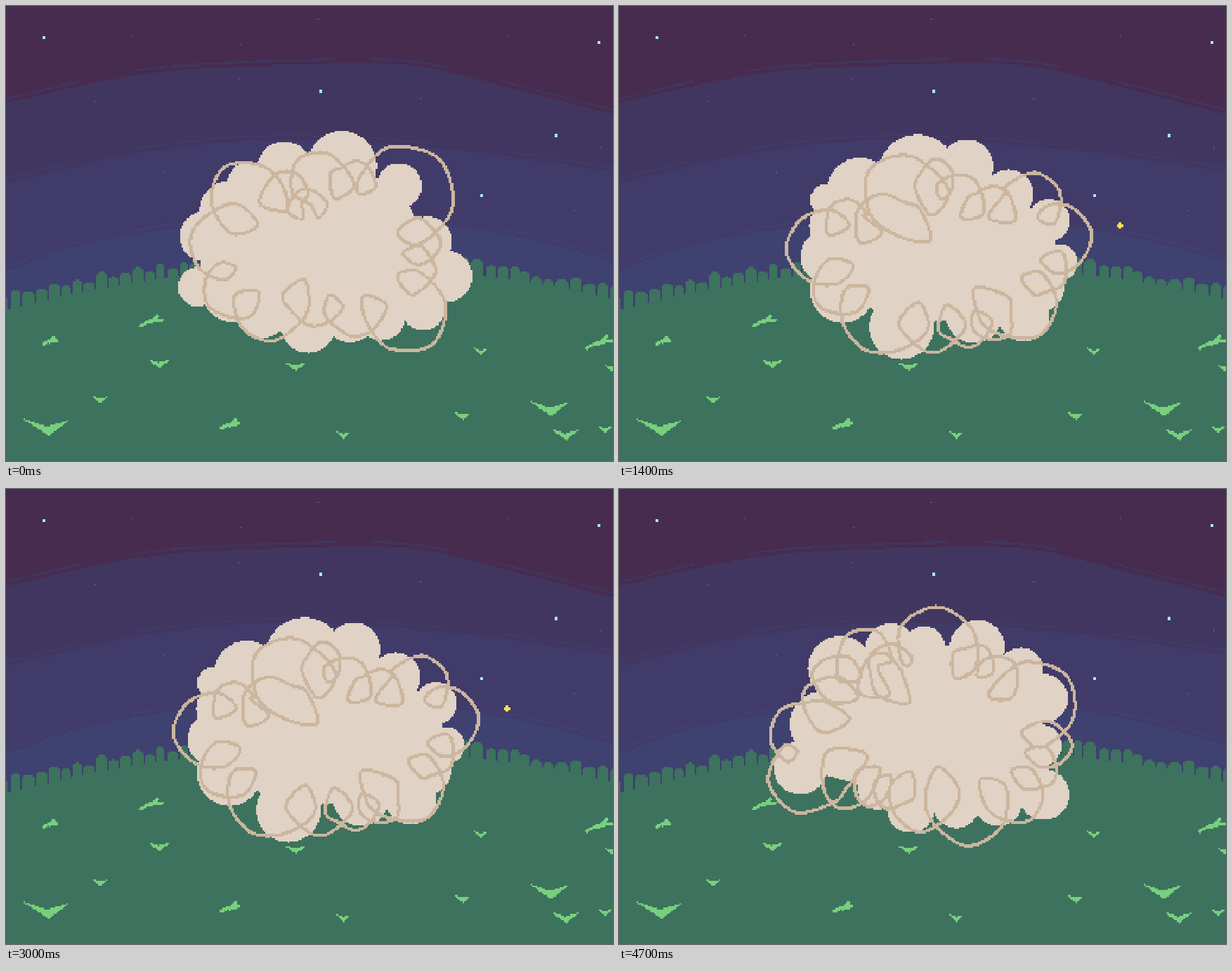
These frames come from a looping animation (864x648 px, 4800 ms). An HTML page with a canvas:

```html
<!DOCTYPE html>
<html lang="en">
<head>
<meta charset="utf-8">
<title>Scuffle cloud at night</title>
<style>
  html, body { margin: 0; width: 100%; height: 100%; overflow: hidden; background: #472c50; }
  canvas { display: block; width: 864px; height: 648px; image-rendering: pixelated; }
</style>
</head>
<body>
<canvas id="stage" width="384" height="288"></canvas>
<script>
const W = 384, H = 288, PIXEL = 2.25, STEP = 100;
const CREAM = '#e0d2c4', TAN = '#ccb69f', HILL = '#3d725e', LEAF = '#78d07d', YELLOW = '#ffe04c';
const CENTRE = [445, 335];

const rows = (text, size) => {
  const all = text.trim().split(/\s+/).map(Number);
  return Array.from({ length: all.length / size }, (_, i) => all.slice(i * size, (i + 1) * size));
};

function seeded(seed) {
  return () => (seed = (seed * 16807) % 2147483647) / 2147483647;
}

function newCanvas() {
  const canvas = document.createElement('canvas');
  canvas.width = W;
  canvas.height = H;
  return canvas;
}

// Paints one flat colour in stage units, with hard pixel edges.
function layer(target, color, paint, mirrored) {
  const canvas = newCanvas(), ctx = canvas.getContext('2d', { willReadFrequently: true });
  ctx.scale(1 / PIXEL, 1 / PIXEL);
  if (mirrored) ctx.transform(-1, 0, 0, 1, 910, 0);
  ctx.fillStyle = ctx.strokeStyle = color;
  ctx.lineWidth = 4.5;
  paint(ctx);
  const image = ctx.getImageData(0, 0, W, H), data = image.data;
  for (let i = 3; i < data.length; i += 4) data[i] = data[i] > 120 ? 255 : 0;
  ctx.putImageData(image, 0, 0);
  target.drawImage(canvas, 0, 0);
}

// Smooth line through the points.
function spline(p, closed) {
  const n = p.length;
  const at = i => closed ? p[(i + n) % n] : p[Math.max(0, Math.min(n - 1, i))];
  let d = 'M' + p[0];
  for (let i = 0; i < (closed ? n : n - 1); i++) {
    const [a, b, c, e] = [at(i - 1), at(i), at(i + 1), at(i + 2)];
    const c1 = b.map((v, k) => v + (c[k] - a[k]) / 6);
    const c2 = c.map((v, k) => v - (e[k] - b[k]) / 6);
    d += `C${c1} ${c2} ${c}`;
  }
  return d;
}

// puffs: x, y, radius. loops: x, y, length, lift of the arc that follows.
const poses = [
  {
    puffs: `283 328 36  318 292 43  344 252 29  396 232 39  478 228 50  560 256 32  600 335 35
      628 385 36  594 431 31  535 443 33  490 440 39  430 455 39  365 432 40  322 408 42  273 400 28`,
    loops: `325 303 34 68  376 266 34 43  411 286 20 24  445 282 20 65  478 247 29 28
      515 250 22 94  587 320 30 32  587 355 22 27  583 395 28 84  527 437 30 36
      466 432 22 30  412 420 33 54  337 427 30 42  307 378 20 55`
  },
  {
    puffs: `312 312 41  295 276 23  343 263 47  425 240 57  495 228 38  555 268 35  612 305 30
      627 365 26  599 400 35  576 442 36  505 440 40  402 457 46  318 405 46  296 357 38`,
    loops: `345 318 30 46  412 308 40 88  445 260 38 42  463 258 18 32  507 285 26 30
      555 288 32 55  617 296 22 52  626 365 26 26  597 396 26 64  535 432 42 38
      518 455 24 30  474 457 32 38  419 455 34 59  332 418 28 45  305 378 30 65  300 308 28 38`
  },
  {
    puffs: `290 335 47  315 255 46  387 228 37  435 223 28  510 225 39  572 258 32  605 298 34
      600 365 30  605 435 36  540 446 34  480 450 33  415 455 34  368 428 28  258 397 38`,
    loops: `292 325 36 43  312 287 30 42  320 255 28 68  355 272 36 42  386 278 38 45
      408 240 12 74  492 243 30 28  523 255 18 34  550 284 26 79  603 349 30 43
      602 381 24 34  580 412 24 54  536 437 32 72  460 435 40 56  403 430 30 30
      374 423 20 34  350 415 28 50  310 400 48 75  236 377 18 50`
  }
];

function drawPuffs(ctx, puffs) {
  ctx.beginPath();
  puffs.forEach(([x, y]) => ctx.lineTo(x, y));
  ctx.fill();
  puffs.forEach(([x, y, r]) => {
    ctx.beginPath();
    ctx.arc(x, y, r, 0, Math.PI * 2);
    ctx.fill();
  });
}

// One endless pen line: a loop towards the centre, then an arc bulging outwards.
function curlLine(loops) {
  return spline(loops.flatMap(([x, y, length, lift], i) => {
    const [nextX, nextY] = loops[(i + 1) % loops.length];
    const toCentre = Math.hypot(CENTRE[0] - x, CENTRE[1] - y);
    const ux = (CENTRE[0] - x) / toCentre, uy = (CENTRE[1] - y) / toCentre;
    const half = length * 0.62;
    const chord = Math.hypot(nextX - x, nextY - y);
    const dx = (nextX - x) / chord, dy = (nextY - y) / chord;
    const shoulder = chord * 0.25 + lift * 0.4;
    const arc = (along, out) =>
      [(x + nextX) / 2 + dx * along + dy * out, (y + nextY) / 2 + dy * along - dx * out];
    return [
      [x + uy * half, y - ux * half],
      [x + ux * length, y + uy * length],
      [x - uy * half, y + ux * half],
      arc(-shoulder, lift * 0.6), arc(0, lift), arc(shoulder, lift * 0.6)
    ];
  }), true);
}

function drawCloud({ puffs, loops }, mirrored) {
  const canvas = newCanvas(), ctx = canvas.getContext('2d');
  layer(ctx, CREAM, c => drawPuffs(c, rows(puffs, 3)), mirrored);
  layer(ctx, TAN, c => c.stroke(new Path2D(curlLine(rows(loops, 4)))), mirrored);
  return canvas;
}

const bands = [
  { color: '#41365f', edge: '0 138 200 96 420 83 580 85 700 112 864 154' },
  { color: '#413b69', edge: '0 252 200 207 400 190 640 205 864 236' },
  { color: '#3f4170', edge: '0 377 150 331 450 295 700 323 864 364' }
];
const brightStars = '54 44  447 122  783 185  677 271  844 51';
const dimStars = '445 19  178 42  334 55  332 105  126 136  714 42  590 131  848 202  223 237  808 291';

// Centre x, centre y, half width.
const tufts = `218 510 9  412 514 9  134 561 6  58 602 25  480 611 6  650 584 6
  676 492 6  774 575 21  861 516 5  796 611 13  853 603 6`;
const sprigs = '63 477 11  207 449 17  319 596 15  845 479 20';

const snap = v => Math.round(v / PIXEL) * PIXEL;
const dots = (text, size) => ctx => rows(text, 2).forEach(([x, y]) =>
  ctx.fillRect(snap(x - size / 2), snap(y - size / 2), size, size));

const hillTop = x => 351 + 62 * ((x - 465) / 465) ** 2;

function drawHill(ctx) {
  const random = seeded(11);
  for (let x = -8; x < 864;) {
    const width = 14 + random() * 8, top = hillTop(x + width / 2) + random() * 16 - 5;
    ctx.beginPath();
    ctx.roundRect(snap(x), top, snap(width - PIXEL), 60, [width / 2, width / 2, 0, 0]);
    ctx.fill();
    x += width;
  }
  ctx.beginPath();
  for (let x = 0; x <= 864; x += 8) ctx.lineTo(x, hillTop(x) + 20);
  ctx.lineTo(864, 648);
  ctx.lineTo(0, 648);
  ctx.fill();
}

function drawGrass(ctx) {
  ctx.lineWidth = 3;
  rows(tufts, 3).forEach(([x, y, w]) => {
    const blade = new Path2D(`M${x - w} ${y - w * 0.4}L${x} ${y - w * 0.05}L${x + w} ${y - w * 0.35}L${x + w * 0.1} ${y + w * 0.25 + 2}Z`);
    ctx.fill(blade);
    ctx.stroke(blade);
  });
  ctx.lineWidth = 4.5;
  rows(sprigs, 3).forEach(([x, y, w]) => {
    ctx.stroke(new Path2D(`M${x - w} ${y + w * 0.45}L${x - w * 0.2} ${y}L${x + w} ${y - w * 0.1}` +
      `M${x + w * 0.6} ${y - w * 0.5}L${x - w * 0.2} ${y + w * 0.2}`));
  });
}

function drawScenery() {
  const canvas = newCanvas(), ctx = canvas.getContext('2d');
  ctx.fillStyle = '#472c50';
  ctx.fillRect(0, 0, W, H);
  for (const { color, edge } of bands) {
    const line = spline(rows(edge, 2));
    layer(ctx, color, c => {
      c.fill(new Path2D(line + 'V648H0Z'));
      c.lineWidth = 2.6;
      c.setLineDash([110, 75, 290, 50]);
      c.translate(0, -6);
      c.stroke(new Path2D(line));
    });
  }
  layer(ctx, '#485875', dots(dimStars, PIXEL));
  layer(ctx, '#a4e7f0', dots(brightStars, PIXEL * 2));
  layer(ctx, HILL, drawHill);
  layer(ctx, LEAF, drawGrass);
  return canvas;
}

function drawSpark(color, paint) {
  const canvas = newCanvas();
  layer(canvas.getContext('2d'), color, paint);
  return canvas;
}

const tick = length => drawSpark(CREAM, ctx => {
  ctx.lineWidth = 2.4;
  ctx.stroke(new Path2D(`M259 269l${-length} ${-length}`));
});

const star = radius => drawSpark(YELLOW, ctx => {
  const arm = radius * 0.45;
  ctx.translate(713, 312.5);
  ctx.fillRect(-arm, -radius, arm * 2, radius * 2);
  ctx.fillRect(-radius, -arm, radius * 2, arm * 2);
});

const scenery = drawScenery();
const clouds = [drawCloud(poses[0]), drawCloud(poses[0], true), drawCloud(poses[1]), drawCloud(poses[2])];
const sparks = [null, tick(18), tick(9), null, null, star(10), star(5), null];
const stage = document.getElementById('stage').getContext('2d');

function render(time) {
  const step = Math.floor(time / STEP) % sparks.length;
  stage.drawImage(scenery, 0, 0);
  stage.drawImage(clouds[step % clouds.length], 0, 0);
  if (sparks[step]) stage.drawImage(sparks[step], 0, 0);
}

const start = performance.now();
function loop(now) {
  render(Math.max(0, now - start));
  requestAnimationFrame(loop);
}
render(0);
requestAnimationFrame(loop);
</script>
</body>
</html>
```
